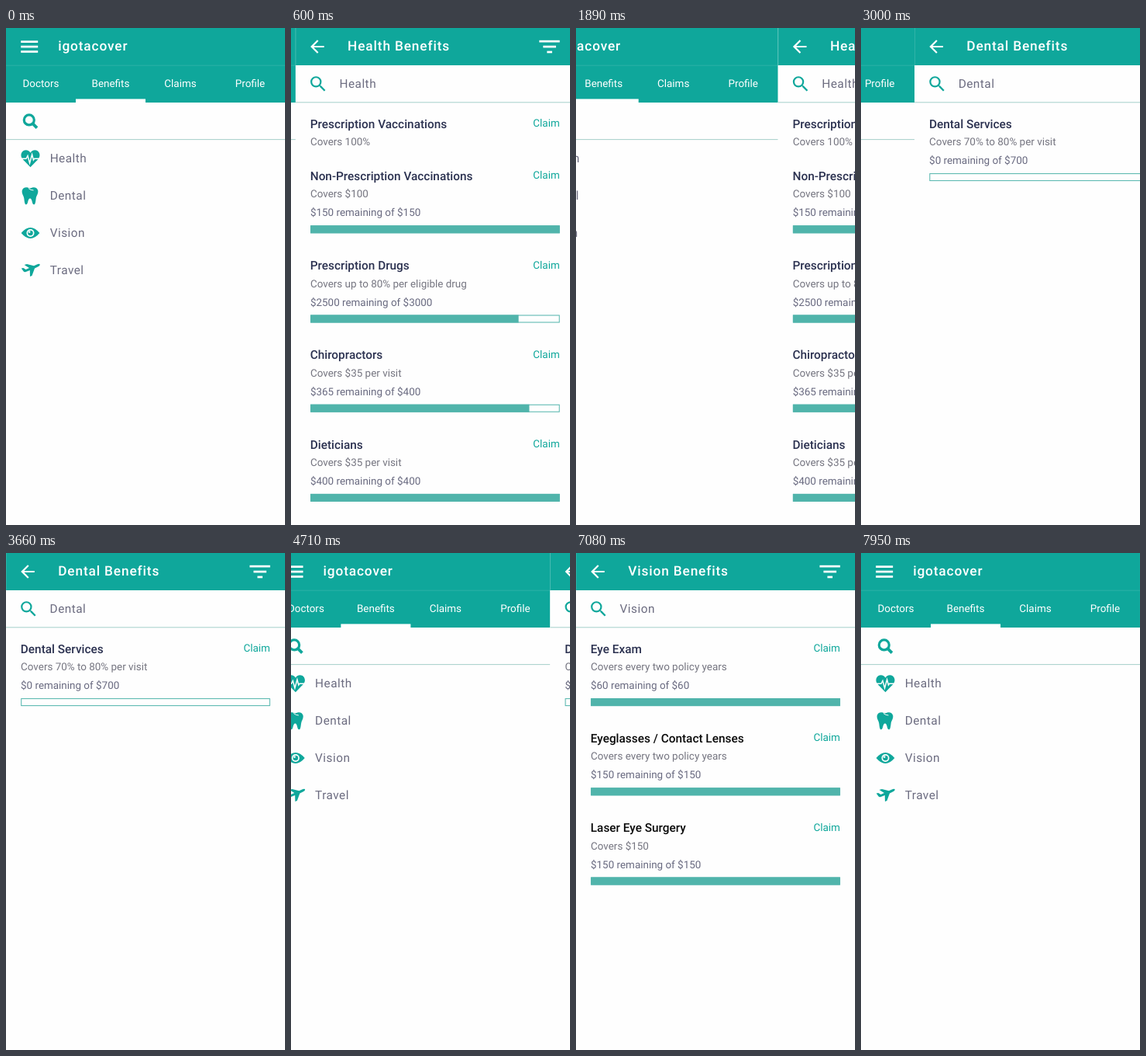
An HTML page for the animation above (8100 ms loop, 360 by 640 pixels).

```html
<!DOCTYPE html>
<html lang="en">
<head>
<meta charset="utf-8">
<title>Benefits</title>
<style>
  html, body { margin: 0; width: 100%; height: 100%; overflow: hidden; background: #fefefe; }
  svg { display: block; width: 360px; height: 640px; }
  text { font-family: Roboto, sans-serif; font-size: 13.44px; text-rendering: geometricPrecision; }
  .title { font-size: 17.28px; font-weight: 500; letter-spacing: .85px; fill: #fff; }
  .label { font-size: 15.36px; letter-spacing: .48px; fill: #6c6c80; }
  .tab { fill: #fff; text-anchor: middle; }
  .name { font-size: 15.36px; font-weight: 500; fill: #2b3150; }
  .cover { fill: #757580; }
  .left { fill: #696a80; }
  .claim { fill: #0fa79b; text-anchor: end; }
</style>
</head>
<body>
<svg id="stage" viewBox="0 0 360 640"></svg>
<script>
const TEAL = '#0fa79b', BAR = '#50b4ab', RULE = '#a6d0ca', PAPER = '#fefefe';
const LOOP = 8100, WIDTH = 360, LEFT = 19.2, RIGHT = 340.8;

const rect = (x, y, w, h, fill, extra = '') =>
  `<rect x="${x}" y="${y}" width="${w}" height="${h}" fill="${fill}" ${extra}/>`;
const text = (x, y, cls, str, extra = '') =>
  `<text x="${x}" y="${y}" class="${cls}" ${extra}>${str}</text>`;
const path = (d, fill = TEAL, extra = '') => `<path d="${d}" fill="${fill}" ${extra}/>`;
const line = (d, color, width) =>
  path(d, 'none', `stroke="${color}" stroke-width="${width}"`);

const heart = path('M31.5 179.3L21.3 168.8C17.2 163.4 20.5 157.2 25.7 157.2C28.4 157.2 30.4 158.6 31.5 160.8' +
    'C32.6 158.6 34.6 157.2 37.3 157.2C42.5 157.2 45.8 163.4 41.7 168.8Z') +
  line('M19 168.3H26L28 164.5L30.6 174L33.6 163L35.4 170L36.6 168.3H44', PAPER, 1.5);

const tooth = path('M31 206.6C27.5 204.4 21.6 204.2 20.7 209.6C20.2 213.6 22.8 216 23.3 219.4' +
    'C23.8 223 24 227.3 26 227.3C28.6 227.3 27.9 219.4 31 219.4C34.1 219.4 33.4 227.3 36 227.3' +
    'C38 227.3 38.2 223 38.7 219.4C39.2 216 41.8 213.6 41.3 209.6C40.4 204.2 34.5 204.4 31 206.6Z') +
  line('M29 206.5Q32 209 35.5 209', PAPER, 1);

const eye = path('M19.6 264Q31.5 250 43.4 264Q31.5 278 19.6 264Z') +
  `<circle cx="31.5" cy="264" r="5" fill="${PAPER}"/><circle cx="31.5" cy="264" r="3.3" fill="${TEAL}"/>` +
  `<circle cx="30.2" cy="262.6" r="1.3" fill="${PAPER}"/>`;

const plane = path('M19.8 309.6L22.4 309L25.6 311L30 309L23.6 305L27 304L36 306.3L40.5 304.3' +
  'Q43.5 303.2 43.8 304.8Q43.8 306.3 41 307.6L37 309.4L33.5 319L31 320L30.8 312L25 314.2Q23.5 314.5 22.5 313.3Z');

const bars = rows => rows.map(([x, y, w]) => rect(x, y, w, 2.7, '#fff')).join('');

function homeScreen() {
  const tabs = ['Doctors', 'Benefits', 'Claims', 'Profile'];
  const rows = ['Health', 'Dental', 'Vision', 'Travel'];
  return rect(0, 0, WIDTH, 640, PAPER) + rect(0, 0, WIDTH, 96, TEAL) +
    rect(0, 47.8, WIDTH, .7, '#37b5ab') +
    bars([[19.2, 16.3, 22], [19.2, 22.7, 22], [19.2, 29.1, 22]]) +
    text(67.2, 29.3, 'title', 'igotacover') +
    tabs.map((tab, i) => text(45 + 90 * i, 76.4, 'tab', tab)).join('') +
    rect(90, 91.4, 90, 4.6, '#fff') +
    `<circle cx="29.8" cy="118.4" r="6.5" fill="none" stroke="${TEAL}" stroke-width="3.2"/>` +
    line('M34.5 123.2L40 128.7', TEAL, 3.8) +
    rect(0, 143.1, WIDTH, 1, RULE) +
    heart + tooth + eye + plane +
    rows.map((row, i) => text(56.7, 173 + 48 * i, 'label', row)).join('');
}

function benefit(y, [name, cover, left, share, color]) {
  let out = text(LEFT - .4, y, 'name', name, color ? `style="fill:${color}"` : '') +
    text(RIGHT, y - 1.5, 'claim', 'Claim') +
    text(LEFT - .2, y + 22.4, 'cover', cover);
  if (left) {
    const w = RIGHT - LEFT;
    out += text(LEFT - .2, y + 46.4, 'left', left) +
      rect(LEFT + .5, y + 58.9, w - 1, 9, PAPER, `stroke="${BAR}"`) +
      rect(LEFT, y + 58.4, w * share, 10, BAR);
  }
  return out;
}

function benefitScreen({ kind, items }) {
  let y = 128.7, list = '';
  for (const item of items) {
    list += benefit(y, item);
    y += item[2] ? 115.2 : 67.2;
  }
  return rect(0, 0, WIDTH, 640, PAPER) + rect(0, 0, WIDTH, 48, TEAL) +
    rect(0, 0, .7, 48, '#37b5ab') +
    path('M20 11H7.83l5.59-5.59L12 4l-8 8 8 8 1.41-1.41L7.83 13H20z', '#fff',
      'transform="translate(14.8 10.8) scale(1.1)"') +
    text(67.2, 29.3, 'title', kind + ' Benefits') +
    bars([[314.4, 15.8, 26.4], [319.4, 22.7, 16.6], [324.4, 29.6, 6.6]]) +
    path('M15.5 14h-.79l-.28-.27A6.47 6.47 0 0 0 16 9.5 6.5 6.5 0 1 0 9.5 16c1.61 0 3.09-.59 4.23-1.57l.27.28v.79' +
      'l5 4.99L20.49 19zM9.5 14a4.5 4.5 0 1 1 0-9 4.5 4.5 0 0 1 0 9z', TEAL,
      'transform="translate(15.8 58.8) scale(1.11)"') +
    text(56.6, 77.1, 'label', kind) +
    rect(0, 95.3, WIDTH, 1, RULE) + list;
}

const plans = [
  { kind: 'Health', open: 247, close: 1770, items: [
    ['Prescription Vaccinations', 'Covers 100%'],
    ['Non-Prescription Vaccinations', 'Covers $100', '$150 remaining of $150', 1],
    ['Prescription Drugs', 'Covers up to 80% per eligible drug', '$2500 remaining of $3000', .835],
    ['Chiropractors', 'Covers $35 per visit', '$365 remaining of $400', .878],
    ['Dieticians', 'Covers $35 per visit', '$400 remaining of $400', 1]] },
  { kind: 'Dental', open: 2850, close: 4478, items: [
    ['Dental Services', 'Covers 70% to 80% per visit', '$0 remaining of $700', 0]] },
  { kind: 'Vision', open: 5597, close: 7125, items: [
    ['Eye Exam', 'Covers every two policy years', '$60 remaining of $60', 1],
    ['Eyeglasses / Contact Lenses', 'Covers every two policy years', '$150 remaining of $150', 1, '#0a0a0a'],
    ['Laser Eye Surgery', 'Covers $150', '$150 remaining of $150', 1, '#0a0a0a']] }
];

const stage = document.getElementById('stage');
stage.innerHTML = `<g>${homeScreen()}</g>` + plans.map(p => `<g>${benefitScreen(p)}</g>`).join('');
const [home, ...panels] = stage.children;

// Overdamped spring with a small starting velocity: the share of the way still to go.
function remaining(ms) {
  if (ms <= 0) return 1;
  const s = ms / 1000;
  return 1.193 * Math.exp(-12.1 * s) - .193 * Math.exp(-66.9 * s);
}

const moveTo = (node, x) => node.setAttribute('transform', `translate(${x.toFixed(2)} 0)`);

function draw(t) {
  let current = 0;
  plans.forEach((plan, i) => { if (t >= plan.open) current = i; });
  const { open, close } = plans[current];
  const x = WIDTH * (t < close ? remaining(t - open) : 1 - remaining(t - close));
  moveTo(home, x - WIDTH);
  panels.forEach((panel, i) => {
    panel.style.display = i === current ? '' : 'none';
    moveTo(panel, x);
  });
}

const start = performance.now();
function tick() {
  draw((performance.now() - start) % LOOP);
  requestAnimationFrame(tick);
}
tick();
</script>
</body>
</html>
```
